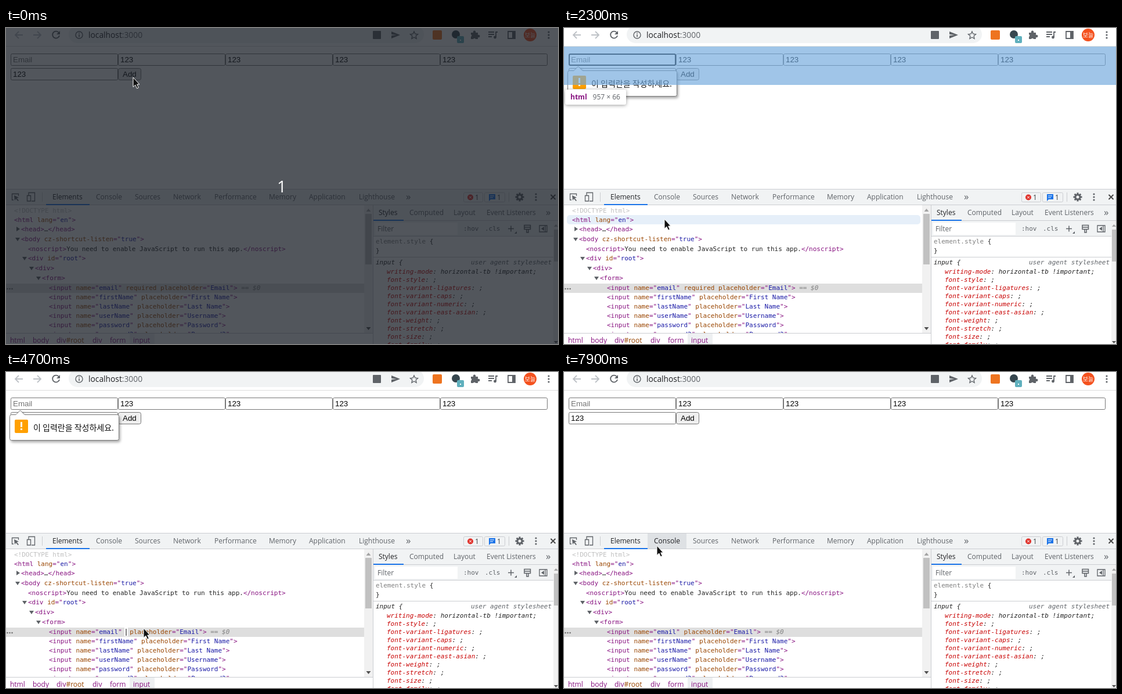
These frames come from a looping animation (951 px wide and 544 px high, 8000 ms). An HTML page:

```html
<!DOCTYPE html>
<html lang="en">
<head>
<meta charset="utf-8">
<title>Editing a required attribute in the inspector</title>
<style>
html, body { margin: 0; width: 100%; height: 100%; overflow: hidden; background: #fff; }
svg { display: block; width: 100vw; height: 100vh; }
text { white-space: pre; }
.ui { font: 12px "Open Sans", "Noto Sans", sans-serif; fill: #3c4043; }
.page { font: 13.333px "Liberation Sans", Arial, sans-serif; fill: #000; }
.mono { font: 11px "DejaVu Sans Mono", monospace; fill: #222; }
.ko { font: 14px "Noto Sans CJK KR", "Noto Sans CJK", sans-serif; fill: #111; }
.tag { fill: #881280; }
.attr { fill: #994500; }
.val { fill: #1a1aa6; }
.prop { fill: #c80000; }
.grey { fill: #808080; }
.it { font-style: italic; }
.icon { fill: none; stroke: #5f6368; stroke-width: 1.8; }
</style>
</head>
<body>
<svg id="stage" viewBox="0 0 951 544" preserveAspectRatio="none"></svg>
<script>
const stage = document.getElementById('stage');
const LOOP = 8000, TICK = 100;

// Cursor waypoints: time, x, y
const PATH = [
  [0, 219, 85], [1900, 219, 85], [2100, 160, 289], [2200, 160, 289], [2300, 173, 329],
  [3000, 236, 446], [3900, 236, 446], [4000, 236, 444], [4200, 236, 444], [4300, 237, 441],
  [5200, 237, 441], [5600, 190, 150], [5800, 170, 4], [6100, 150, 28], [6500, 95, 72],
  [6600, 95, 72], [6900, 210, 77], [7700, 210, 77], [7900, 160, 299]
];

const between = (t, a, b) => t >= a && t < b;
const rect = (x, y, w, h, fill, extra = '') =>
  `<rect x="${x}" y="${y}" width="${w}" height="${h}" fill="${fill}" ${extra}/>`;
const box = (x, y, w, h, fill, stroke, r = 2, width = 1) =>
  rect(x + .5, y + .5, w - 1, h - 1, fill, `stroke="${stroke}" stroke-width="${width}" rx="${r}"`);
const text = (cls, x, y, s, extra = '') => `<text class="${cls}" x="${x}" y="${y}" ${extra}>${s}</text>`;
const shape = (d, fill, extra = '') => `<path d="${d}" fill="${fill}" ${extra}/>`;
const icon = (d, extra = '') => `<path class="icon" d="${d}" ${extra}/>`;
const dot = (x, y, r, fill) => `<circle cx="${x}" cy="${y}" r="${r}" fill="${fill}"/>`;
const dots = (x, y) => [-5, 0, 5].map(d => dot(x, y + d, 1.6, '#5f6368')).join('');
const span = (cls, s) => `<tspan class="${cls}">${s}</tspan>`;
const attr = (name, value) => span('attr', name) + span('tag', '="') + span('val', value) + span('tag', '"');
const open = (name, ...attrs) => span('tag', '&lt;' + name) + attrs.map(a => ' ' + a).join('') + span('tag', '&gt;');
const close = name => span('tag', `&lt;/${name}&gt;`);
const field = (name, hint) => open('input', attr('name', name), attr('placeholder', hint));

function cursorAt(t) {
  const i = PATH.findIndex(p => p[0] > t);
  if (i < 0) return PATH[PATH.length - 1].slice(1);
  const [t0, x0, y0] = PATH[i - 1], [t1, x1, y1] = PATH[i], k = (t - t0) / (t1 - t0);
  return [x0 + (x1 - x0) * k, y0 + (y1 - y0) * k];
}

// Tree rows: indent, centre y, markup, arrow ('r' closed, 'd' open), highlighted node
const block = name => ({ name, size: '941 × 50', x: 8, y: 40, w: 943, h: 50, tip: name.length * 7 + 78 });
const ROWS = [
  [14, 314, '<tspan fill="#c0c0c0">&lt;!DOCTYPE html&gt;</tspan>'],
  [14, 330, open('html', attr('lang', 'en')), '',
    { name: 'html', size: '957 × 66', x: 0, y: 32, w: 951, h: 66, tip: 105 }],
  [26, 346, open('head') + '…' + close('head'), 'r'],
  [26, 363, open('body', attr('cz-shortcut-listen', 'true')), 'd', { ...block('body'), margin: true }],
  [38, 380, open('noscript') + 'You need to enable JavaScript to run this app.' + close('noscript')],
  [38, 396, open('div', attr('id', 'root')), 'd', block('div#root')],
  [50, 413, open('div'), 'd', block('div')],
  [62, 430, open('form'), 'd', block('form')],
  [74, 447, '', '', { name: 'input', size: '185 × 21', x: 8, y: 44, w: 185, h: 21, tip: 110, framed: true }],
  [74, 463, field('firstName', 'First Name')],
  [74, 479, field('lastName', 'Last Name')],
  [74, 495, field('userName', 'Username')],
  [74, 511, field('password', 'Password')],
  [74, 527, field('password2', 'Password2')]
];

function browserBar() {
  return rect(0, 31, 951, 1, '#dcdcdc')
    + rect(108, -4, 612, 30, '#f1f3f4', 'rx="15"')
    + icon('M29 12H16M22 6l-6 6 6 6M47 12h13M54 6l6 6-6 6', 'style="stroke:#bdc1c6"')
    + icon('M91 8a6 6 0 1 0 1 5') + shape('M93 5v6h-6z', '#5f6368')
    + `<circle class="icon" cx="126" cy="12" r="6" style="stroke-width:1.4"/>` + rect(125.2, 11, 1.6, 4.5, '#5f6368') + rect(125.2, 8, 1.6, 1.6, '#5f6368')
    + text('ui', 142, 17, 'localhost<tspan fill="#5f6368">:3000</tspan>', 'style="font-size:13.8px;fill:#202124"')
    + rect(632, 5, 14, 14, '#5f6368', 'rx="1"')
    + shape('M664 6l15 6-15 6v-5l9-1-9-1z', '#5f6368')
    + icon('M703 6l1.9 4.2 4.6.5-3.4 3.1.9 4.5-4-2.3-4 2.3.9-4.5-3.4-3.1 4.6-.5z', 'style="stroke-width:1.4"')
    + rect(735, 4, 16, 16, '#ee7420', 'rx="2"')
    + dot(775, 11, 7, '#37474f') + rect(777, 14, 12, 12, '#5fb0bd', 'rx="2"') + rect(782, 20, 2, 2, '#fff')
    + shape('M801 8h4a2.3 2.3 0 1 1 4 0h4v4a2.3 2.3 0 1 1 0 4v3h-4a2.2 2.2 0 0 0-4 0h-4v-4a2.2 2.2 0 0 0 0-4z', '#5f6368')
    + icon('M831 7h10M831 11h10M831 15h6M844 16V7h3') + dot(842.5, 16, 2.4, '#5f6368')
    + icon('M865 6h12v12h-12z') + rect(872, 6, 5, 12, '#5f6368')
    + dot(903, 12, 11, '#f4511e') + text('ko', 903, 16, '보늘', 'text-anchor="middle" style="font-size:10px;fill:#fff"')
    + dots(935, 12);
}

function page(t) {
  const focused = between(t, 1800, 3800);
  const [cx, cy] = cursorAt(t);
  const overAdd = between(cx, 193, 233) && between(cy, 69, 90);
  const pressed = t === 1700 || t === 7600;
  let out = '';
  for (let i = 0; i < 6; i++) {
    const x = 8 + 185 * (i % 5), y = i < 5 ? 44 : 69;
    out += box(x, y, 185, 21, '#fff', '#767676')
      + text('page', x + 4, y + 15, i ? '123' : 'Email', i ? '' : 'style="fill:#757575"');
  }
  if (focused) out += box(8.5, 44.5, 184, 20, 'none', '#101010', 2, 2);
  out += box(193, 69, 40, 21, pressed ? '#f5f5f5' : overAdd ? '#e3e3e3' : '#efefef', '#767676', 3)
    + text('page', 201, 84, 'Add');
  if (between(t, 1800, 5500)) {
    out += shape('M9.5 73.5H17l7.5-7.5 7.5 7.5h159.500a3 3 0 0 1 3 3v38a3 3 0 0 1-3 3H9.500a3 3 0 0 1-3-3v-38a3 3 0 0 1 3-3z',
      '#fff', 'stroke="#777" style="filter:drop-shadow(2px 3px 2px #0005)"')
      + rect(15, 82, 23, 23, '#ffa000', 'rx="2"') + rect(25, 86, 3, 9, '#fff') + rect(25, 97, 3, 3, '#fff')
      + text('ko', 47, 101, '이 입력란을 작성하세요.');
  }
  return out;
}

function highlight(n) {
  const tipX = n.framed ? 7 : 2, tipY = n.y + n.h + 8 + (n.framed ? 1 : 0);
  return (n.margin ? shape('M0 32H951V98H0zM8 40V90H951V40z', '#f6b26b', 'opacity=".66" fill-rule="evenodd"') : '')
    + rect(n.x, n.y, n.w, n.h, '#6fa8dc', 'opacity=".66"')
    + (n.framed ? box(n.x + .5, n.y + .5, n.w - 1, n.h - 1, 'none', '#b08a48', 2, 2) : '')
    + rect(tipX, tipY, n.tip, 26, '#fff', 'rx="3" style="filter:drop-shadow(0 1px 3px #0006)"')
    + text('ui', tipX + (n.framed ? 10 : 9), tipY + 17,
      `<tspan class="tag" font-weight="bold">${n.name}</tspan><tspan dx="10" fill="#5f6368">${n.size}</tspan>`);
}

function tabBar(consoleHover) {
  const tabs = [['Elements', 80], ['Console', 155], ['Sources', 222], ['Network', 288], ['Performance', 359],
    ['Memory', 453], ['Application', 522], ['Lighthouse', 608]];
  const teeth = [...Array(8)].map((_, i) => rect(883.5, 283.5, 3, 4, '#5f6368', `transform="rotate(${i * 45} 885 291)"`)).join('');
  return rect(0, 277, 951, 28, '#f1f3f4') + rect(0, 277, 951, 1, '#cbcdd1') + rect(0, 304, 951, 1, '#cbcdd1')
    + (consoleHover ? rect(144, 278, 67, 26, '#dee1e4') : '')
    + tabs.map(([name, x], i) => text('ui', x, 295, name, i && !(i === 1 && consoleHover) ? 'style="fill:#5f6368"' : 'style="fill:#202124"')).join('')
    + rect(69, 303, 75, 2, '#1a73e8')
    + icon('M13 296h-2.500V285.500h11V289', 'style="stroke-width:1.3"') + shape('M14 288l8 4-3.500 1 3.500 4-1.500 1-3.500-4-2 3z', '#5f6368')
    + icon('M39 288v-4.500h10.500V298H44M36.500 288.500h6V298h-6z', 'style="stroke-width:1.3"')
    + rect(62, 283, 1, 16, '#cbcdd1') + text('ui', 689, 296, '»', 'style="font-size:17px;fill:#5f6368"')
    + box(788, 283, 34, 17, '#f1f3f4', '#cbcdd1') + dot(800, 291.5, 5, '#e0312a')
    + icon('M798 289.500l4 4M802 289.500l-4 4', 'style="stroke:#fff;stroke-width:1"') + text('ui', 808, 296, '1')
    + box(824, 283, 36, 17, '#f1f3f4', '#cbcdd1') + shape('M832 286h11v9h-8l-3 3z', '#1a73e8')
    + icon('M834 289h7M834 292h5', 'style="stroke:#fff;stroke-width:1"') + text('ui', 846, 296, '1')
    + rect(866, 283, 1, 16, '#cbcdd1')
    + teeth + `<circle class="icon" cx="885" cy="291" r="4" style="stroke-width:3"/>`
    + dots(913, 291) + icon('M938.500 287l8 8M946.500 287l-8 8', 'style="stroke:#444"');
}

function selectedMarkup(t) {
  const name = attr('name', 'email'), hint = attr('placeholder', 'Email');
  const middle = t < 3800 ? [span('attr', 'required')]
    : t < 4700 ? ['<tspan fill="#fff">required</tspan>']
    : t < 5300 ? [''] : [];
  return open('input', name, ...middle, hint) + span('grey it', ' == $0');
}

function tree(t, hovered) {
  let out = rect(0, 305, 632, 239, '#fff')
    + rect(0, 440, 617, 16, between(t, 5300, 7600) ? '#cfe8fc' : '#dedede')
    + [2.5, 6.500, 10.500].map(x => dot(x, 449, 1.2, '#666')).join('');
  if (hovered && !hovered[4]?.framed) out += rect(5, hovered[1] - 8, 609, 16, '#e6eff9', 'rx="5"');
  if (between(t, 3800, 4700)) {
    out += rect(204, 440, 59, 15, '#fff') + rect(206.400, 441, 53, 13, '#1967d2');
  } else if (between(t, 4700, 5300)) {
    out += rect(204, 440, 6, 15, '#fff') + rect(206.500, 442, 1, 12, '#000');
  }
  for (const [x, y, markup, arrow] of ROWS) {
    out += text('mono', x, y + 4, markup || selectedMarkup(t));
    if (arrow === 'r') out += shape(`M${x - 8} ${y - 4}v8l6-4z`, '#5f6368');
    if (arrow === 'd') out += shape(`M${x - 10} ${y - 2}h8l-4 6z`, '#5f6368');
  }
  // The changed tag flashes and fades once the edit is committed
  if (between(t, 5300, 6700)) {
    const glow = (1 - (t - 5300) / 1400) ** 3;
    out += `<g opacity="${glow}">${rect(80.600, 441, 33.100, 13, '#881280')}${text('mono', 80.620, 451, 'input', 'style="fill:#fff"')}</g>`;
  }
  out += rect(617, 305, 15, 220, '#f1f1f1') + rect(619, 320, 11, 87, '#c1c1c1')
    + shape('M620.500 316h8l-4-5z', '#a3a3a3') + shape('M620.500 515h8l-4 5z', '#505050')
    + rect(0, 525, 632, 19, '#fff') + rect(0, 525, 632, 1, '#cbcdd1') + rect(213, 526, 43, 18, '#eef0f2');
  const crumbs = [['html', 7], ['body', 46], ['div' + span('attr', '#root'), 87], ['div', 149], ['form', 179], ['input', 219]];
  return out + crumbs.map(([s, x]) => text('ui', x, 542, span('tag', s))).join('');
}

function stylesPane() {
  const tabs = [['Styles', 642], ['Computed', 695], ['Layout', 771], ['Event Listeners', 828]];
  const props = ['style', 'variant-ligatures', 'variant-caps', 'variant-numeric', 'variant-east-asian',
    'weight', 'stretch', 'size', 'family'];
  return rect(632, 305, 319, 239, '#fff') + rect(633, 305, 318, 53, '#f1f3f4')
    + rect(633, 331, 318, 1, '#cbcdd1') + rect(633, 358, 318, 1, '#cbcdd1') + rect(632, 305, 1, 239, '#cbcdd1')
    + tabs.map(([s, x], i) => text('ui', x, 322, s, `style="fill:${i ? '#5f6368' : '#202124'}"`)).join('')
    + text('ui', 930, 323, '»', 'style="font-size:17px;fill:#5f6368"')
    + rect(633, 330, 52, 2, '#1a73e8') + rect(636, 335, 142, 21, '#fff') + text('ui', 640, 350, 'Filter', 'style="fill:#5f6368"')
    + text('mono', 788, 349, ':hov', 'font-weight="bold" style="fill:#5f6368"')
    + text('mono', 825, 349, '.cls', 'font-weight="bold" style="fill:#5f6368"')
    + icon('M865 345.500h10M870 340.500v10', 'style="stroke-width:1.5"') + shape('M880 350v4h-4z', '#5f6368')
    + icon('M893 339.500h10.500v7H893zM893 343h10M897 347v5h3v-5', 'style="stroke-width:1.5"')
    + icon('M919 340h13v11h-13zM929 340v11', 'style="stroke-width:1.3"') + shape('M927 342v7l-5-3.500z', '#5f6368')
    + text('mono', 637, 371, span('grey', 'element.style') + ' {') + text('mono', 637, 387, '}')
    + rect(633, 394, 310, 1, '#cbcdd1')
    + text('mono it', 637, 407, 'input {') + text('mono it', 801, 407, 'user agent stylesheet', 'style="fill:#5f6368"')
    + text('mono it', 656, 423, span('prop', 'writing-mode') + ': horizontal-tb !important;')
    + props.map((p, i) => text('mono it', 656, 437 + 14 * i, span('prop', 'font-' + p) + ': ;')).join('')
    + rect(943, 332, 8, 212, '#f1f1f1') + rect(944, 347, 7, 55, '#c1c1c1')
    + shape('M944 342h7l-3.500-4z', '#a3a3a3') + shape('M944 539h7l-3.500 4z', '#505050');
}

function countdown() {
  return rect(0, 0, 951, 544, '#191e26', 'opacity=".75"')
    + text('ui', 475, 283, '1', 'text-anchor="middle" style="font-size:28px;fill:#fff"');
}

function render(t) {
  const [x, y] = cursorAt(t);
  const hovered = between(t, 2300, 3800) && ROWS.find(r => Math.abs(r[1] - y) <= 8.500);
  const node = hovered && hovered[4];
  const consoleHover = between(x, 144, 211) && between(y, 278, 305);
  stage.innerHTML = rect(0, 0, 951, 544, '#fff') + browserBar() + page(t) + (node ? highlight(node) : '')
    + tabBar(consoleHover) + tree(t, hovered) + stylesPane() + (t < 200 ? countdown() : '')
    + shape('M0 0V16.500L3.800 13 6.500 19 9.300 17.800 6.700 12H11z', '#111',
      `stroke="#fff" stroke-width="1" transform="translate(${x} ${y})"`);
}

let shown = -1;
function frame(now) {
  const t = Math.floor((now % LOOP) / TICK) * TICK;
  if (t !== shown) render(shown = t);
  requestAnimationFrame(frame);
}
render(0);
requestAnimationFrame(frame);
</script>
</body>
</html>
```
